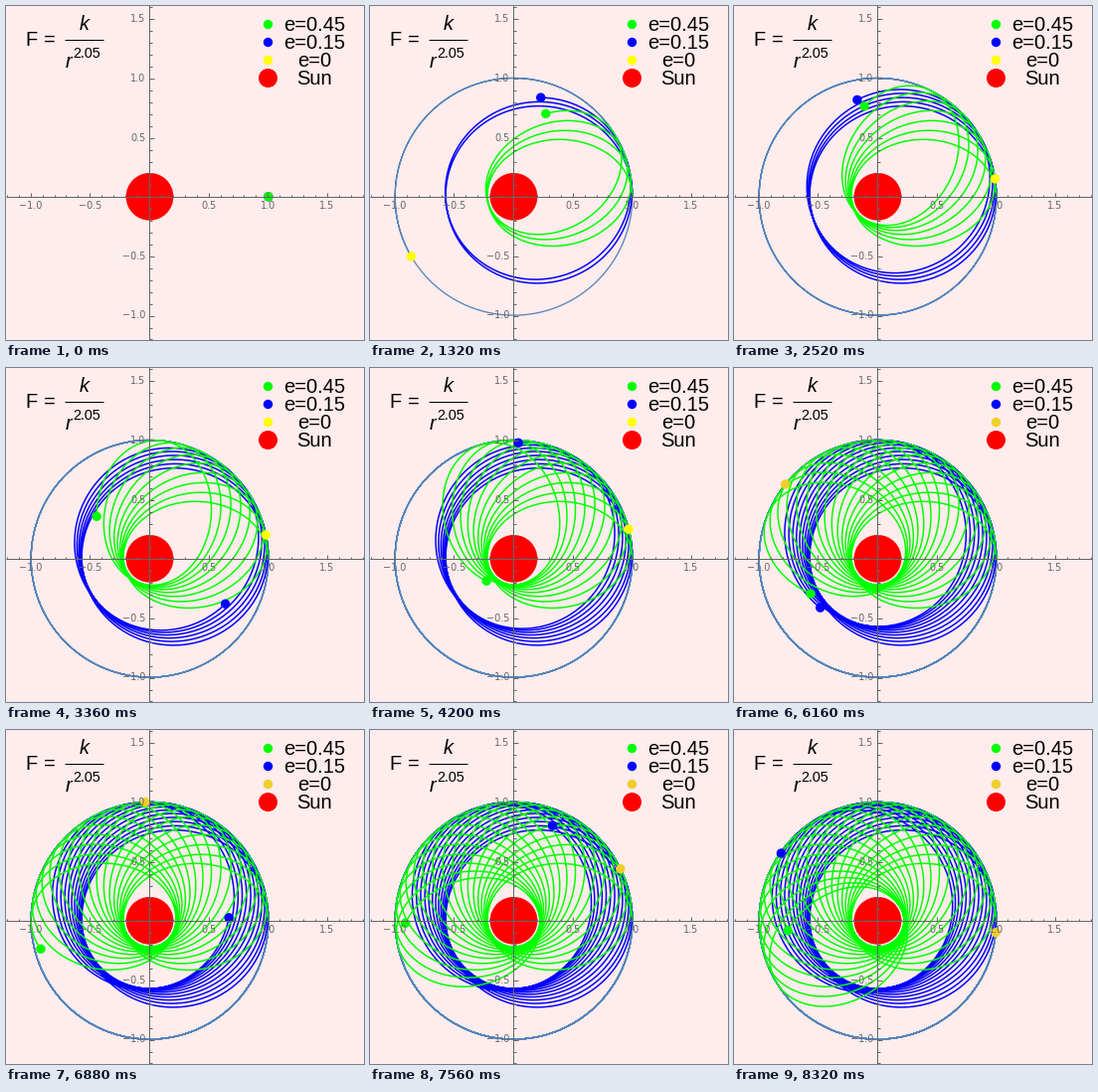
Animation, 360 px wide and 336 px high, one loop 8.36 s. Source, as a matplotlib script:

```python
import numpy as np
import matplotlib.pyplot as plt
from matplotlib.animation import FuncAnimation
from matplotlib.patches import Circle

W, H, DPI = 360, 336, 100
FRAMES, INTERVAL = 209, 40
CX, CY, UNIT = 144.5, 191.8, 119.3   # sun position and pixels per length unit
PT = 72 / DPI                        # points per pixel

POWER = 2.05
K = 4 * np.pi ** 2
DT = 0.048                           # years per frame
SUB = 48                             # integration steps per frame

BLUE, GREEN, RED = "#0000ff", "#00ff00", "#ff0000"
YELLOW, GOLD = "#ffff00", "#f0cf2a"
GOLD_FROM = 129
STEEL, GRAY = "#5585bb", "#666666"

plt.rcParams["path.simplify"] = False


def accel(z):
    return -K * z / np.abs(z) ** (POWER + 1)


def integrate(ecc):
    """RK4 orbits, all released at aphelion (1, 0); complex positions."""
    z = np.ones(len(ecc), complex)
    v = 1j * np.sqrt(K * (1 - ecc) / (1 + ecc))
    h = DT / SUB
    path = [z]
    for _ in range((FRAMES - 1) * SUB):
        a1 = accel(z)
        v2 = v + h / 2 * a1
        a2 = accel(z + h / 2 * v)
        v3 = v + h / 2 * a2
        a3 = accel(z + h / 2 * v2)
        v4 = v + h * a3
        a4 = accel(z + h * v3)
        z = z + h / 6 * (v + 2 * v2 + 2 * v3 + v4)
        v = v + h / 6 * (a1 + 2 * a2 + 2 * a3 + a4)
        path.append(z)
    return np.array(path)


orbits = integrate(np.array([0, 0.15, 0.45]))
px, py = CX + UNIT * orbits.real, CY - UNIT * orbits.imag

fig = plt.figure(figsize=(W / DPI, H / DPI), dpi=DPI, facecolor="#ffecec")
ax = fig.add_axes([0, 0, 1, 1])
ax.set(xlim=(0, W), ylim=(H, 0))
ax.axis("off")


def text(x, y, s, size, color="black", font="Liberation Sans", **kw):
    kw.setdefault("va", "baseline")
    ax.text(x, y, s, fontsize=size * PT, color=color, family=font, zorder=8, **kw)


def dot(x, y, r, color, z=5):
    return ax.add_patch(Circle((x, y), r, fc=color, lw=0, zorder=z))


def rule(x, y, color=GRAY):
    """One-pixel line, nudged so snapping keeps the pixel it lies in."""
    ax.plot(np.array(x) - 0.49, np.array(y) + 0.49, color=color, lw=PT,
            zorder=7, solid_capstyle="butt", snap=True)


def draw_axes():
    rule([0, W + 1], [CY, CY])
    rule([CX, CX], [-1, H])
    for i in range(-12, 19):
        if i == 0:
            continue
        major = i % 5 == 0
        size = 4.5 if major else 2.5
        x, y = CX + UNIT * i / 10, CY - UNIT * i / 10
        rule([x, x], [CY, CY - size])
        if i <= 16:
            rule([CX, CX + size], [y, y])
        if major:
            label = f"{i / 10:.1f}".replace("-", "\u2212")
            text(x - 0.4, 204.5, label, 9.6, GRAY, "DejaVu Sans", ha="center")
            if i <= 16:
                text(140.5, y + 3.4, label, 9.6, GRAY, "DejaVu Sans", ha="right")


def draw_formula():
    text(19.5, 40, "F", 20)
    text(38.3, 40, "=", 20)
    text(79, 24, "k", 20, style="italic", ha="center")
    rule([59, 98], [33.5, 33.5], "black")
    text(59.5, 61.5, "r", 20, style="italic")
    text(67.5, 52.5, "2.05", 14.4)


def draw_legend():
    marks = []
    rows = [("e=0.45", GREEN, 4.7), ("e=0.15", BLUE, 4.7),
            ("e=0", YELLOW, 4.7), ("Sun", RED, 9.5)]
    for i, (label, color, r) in enumerate(rows):
        y = 18.5 + 18 * i
        marks.append(dot(263.5, y, r, color))
        text(310.3, y + 6.5, label, 20.2, ha="center")
    return marks


draw_axes()
draw_formula()
legend = draw_legend()
dot(CX, CY, 0.2 * UNIT, RED, 3)

trails = [ax.plot([], [], color=c, lw=w * PT, zorder=2)[0]
          for c, w in ((STEEL, 1.3), (BLUE, 1.5), (GREEN, 1.5))]
planets = [dot(px[0, i], py[0, i], 4.7, c, 5 + i / 10)
           for i, c in enumerate((YELLOW, BLUE, GREEN))]


def update(n):
    end = n * SUB
    for i, (trail, planet) in enumerate(zip(trails, planets)):
        trail.set_data(px[:end + 1:2, i], py[:end + 1:2, i])
        planet.center = px[end, i], py[end, i]
    for p in (planets[0], legend[2]):
        p.set_facecolor(GOLD if n >= GOLD_FROM else YELLOW)
    return trails + planets


anim = FuncAnimation(fig, update, frames=FRAMES, interval=INTERVAL,
                     init_func=lambda: update(0), repeat=True, repeat_delay=0)
plt.show()
```
